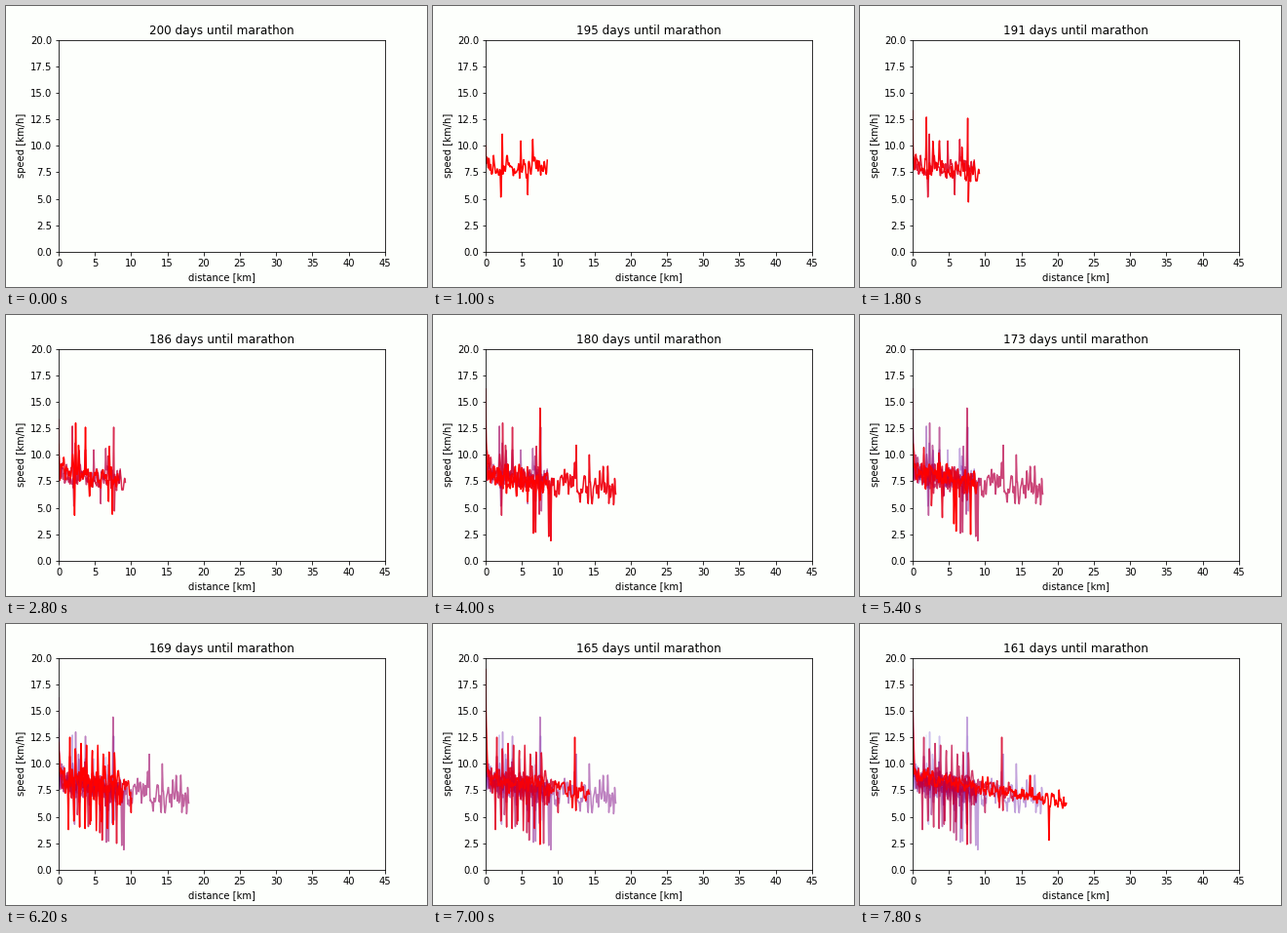
Recreate the animation shown at these times as a matplotlib script. Size 432x288 px, loop 8 s.

```python
import numpy as np
import matplotlib.pyplot as plt
from matplotlib.animation import FuncAnimation

DAYS = 200
FRAMES = 40
FADE = 33        # days until a run has vanished
STEP = 0.05      # km between samples
PAPER = "#fdfffc"

plt.rcParams["font.family"] = "DejaVu Sans"
fig, ax = plt.subplots(figsize=(6, 4), dpi=72, facecolor=PAPER)
fig.subplots_adjust(left=0.125, right=0.9, bottom=0.125, top=0.88)
ax.set_facecolor(PAPER)
ax.set_xlim(0, 45)
ax.set_ylim(0, 20)
ax.set_xticks(range(0, 46, 5))
ax.set_xlabel("distance [km]")
ax.set_ylabel("speed [km/h]")
title = ax.set_title("")

runs = []


def add_run(day, length, pace, start, spikes=(), noise=0.5, burst=1.2):
    """Noisy run from pace[0] to pace[1] km/h, with random bursts and (km, speed) spikes."""
    rng = np.random.default_rng(day)
    x = np.arange(0, length + STEP / 2, STEP)
    kernel = np.array([1, 2, 2, 1])
    wobble = np.convolve(rng.normal(size=x.size), kernel / np.linalg.norm(kernel), "same")
    y = np.interp(x, [0, length], pace) + noise * wobble
    y += (start - pace[0]) * np.exp(-x / 0.12)
    y[0] = start
    for km in np.arange(1, length, 0.8):
        km += rng.uniform(-0.3, 0.3)
        y += rng.normal(0, burst) * np.clip(1 - np.abs(x - km) / 0.12, 0, 1)
    for km, speed in spikes:
        y += (speed - y[round(km / STEP)]) * np.clip(1 - np.abs(x - km) / 0.1, 0, 1)
    line, = ax.plot(x, y, lw=1.5, visible=False)
    runs.append((day, line))


def sprints(first, gap, count):
    """Slow walk followed by a short sprint, repeated."""
    for k in range(count):
        km = first + gap * k
        yield km, 3.8 - 0.1 * (k % 4)
        yield km + 0.2, 12.5 - 0.15 * k


add_run(5, 8.5, (8.1, 8.0), 10, [(2.3, 11.1), (5.8, 5.4), (6.5, 10.6)])
add_run(8, 9.2, (8.1, 7.5), 13.3, [(1.9, 12.7), (7.6, 12.6), (7.7, 4.7)])
add_run(14, 8.3, (8.5, 7.6), 11,
        [(2.2, 4.3), (2.35, 13), (3.7, 12.6), (7.0, 10.8), (7.4, 4.4)])
add_run(18, 17.95, (8.2, 6.8), 16.2,
        [(6.6, 2.6), (6.9, 2.7), (7.5, 14.4), (8.7, 2.3), (9.0, 1.9),
         (12.5, 10.9), (14.3, 10)], noise=0.6)
add_run(20, 8.8, (8.4, 7.3), 10)
add_run(24, 8.5, (8.8, 7.6), 11, [(2.6, 5.2)])
add_run(27, 8.9, (8.8, 7.2), 11, [(5.7, 3.5), (6.0, 2.8), (8.0, 2.5)])
add_run(30, 10.05, (8.8, 7.6), 11.5, [(10.0, 5.4)])
add_run(31, 8.6, (8.6, 8.2), 12, sprints(1.35, 0.77, 9))
add_run(34, 14.3, (8.6, 7.4), 18.9, [(7.5, 2.4), (12.3, 12.5), (12.45, 5.6)],
        noise=0.4, burst=0.8)
add_run(39, 21.2, (8.9, 6.3), 12, [(16.2, 8.9), (18.8, 2.8)], noise=0.35, burst=0.6)


def update(i):
    title.set_text(f"{DAYS - i} days until marathon")
    for day, line in runs:
        line.set_visible(i >= day)
        t = min(max(i - day, 0) / FADE, 1)
        line.set_color((1 - t, 0, t, 1 - t))
    return [title] + [line for _, line in runs]


anim = FuncAnimation(fig, update, frames=FRAMES, interval=200, repeat=True,
                     repeat_delay=0, blit=False)
plt.show()
```
